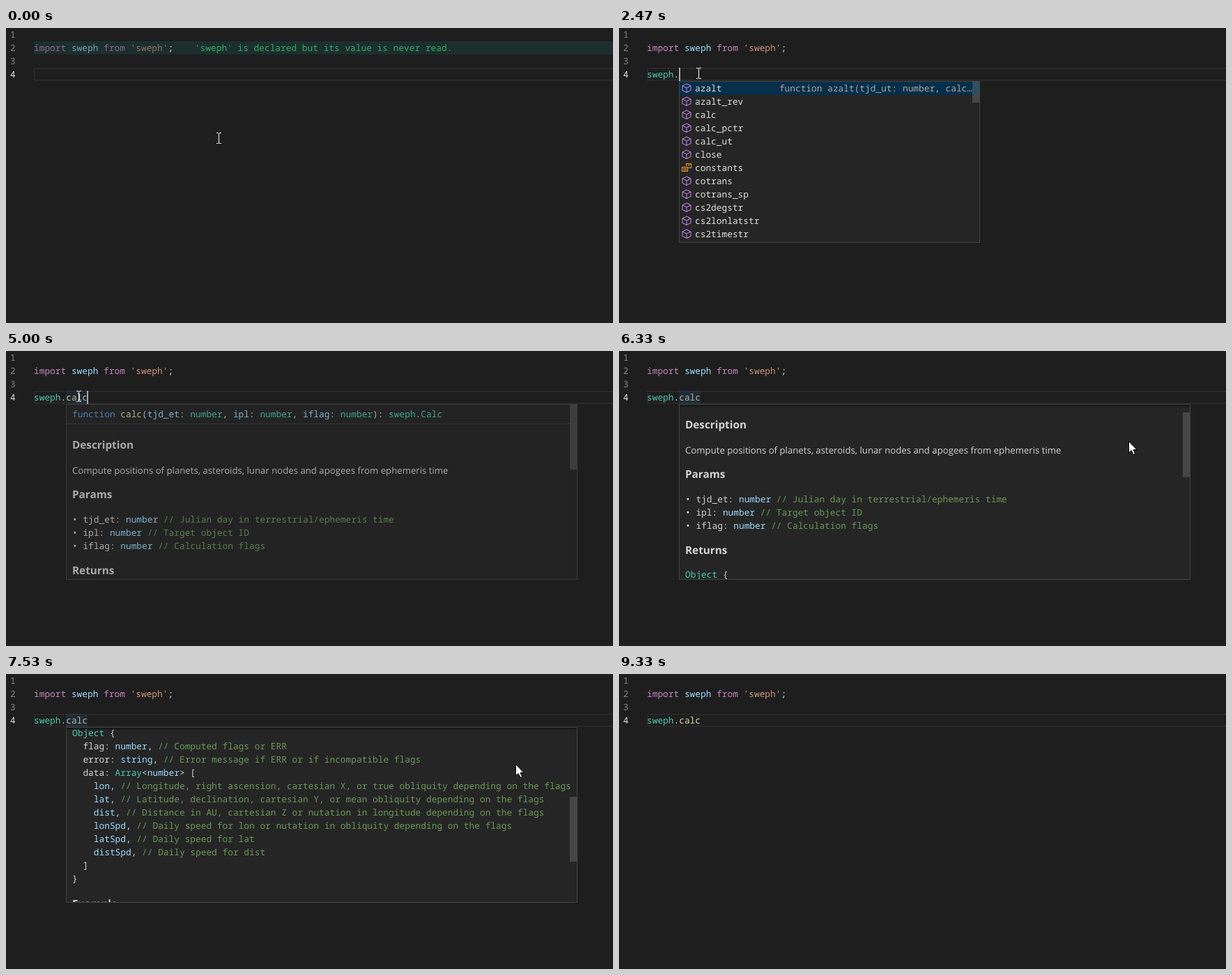
Animation of 871x423 px, one loop 9870 ms. Source, as an HTML page with a canvas:

```html
<!DOCTYPE html>
<html lang="en">
<head>
<meta charset="utf-8">
<title>Editor completion</title>
<style>
html, body { margin: 0; height: 100%; overflow: hidden; background: #1e1e1e; }
canvas { display: block; }
</style>
</head>
<body>
<canvas id="stage" width="871" height="423"></canvas>
<script>
const ctx = document.getElementById('stage').getContext('2d');
const LOOP = 9870, TICK = 200 / 3;
const CHAR = 7.697, LEFT = 40, ROW = 19;
const MONO = '12.83px "Noto Sans Mono", monospace';
const BODY = '13.19px "Open Sans", sans-serif';
const HEAD = 'bold 15.3px "Open Sans", sans-serif';

const COLORS = {
  k: '#c586c0', v: '#9cdcfe', s: '#ce9178', t: '#4ec9b0', f: '#dcdcaa', c: '#6a9955',
  b: '#569cd6', d: '#d4d4d4', n: '#858585', w: '#e0e0e0', h: '#0097fb', g: '#2faf64',
  e: '#ff6464', m: '#a8a8a8'
};

const ICONS = {
  cube: ['#b180d7', 'M8 2L14 5V11.5L8 14.5L2 11.5V5ZM2 5L8 8L14 5M8 8V14.5'],
  field: ['#75beff', 'M1.5 6.5L9 3L14.5 5.5V10L7 13.5L1.5 11ZM1.5 6.5L7 9L14.5 5.5M7 9V13.5'],
  variable: ['#75beff', 'M4 4H1.5V12.5H4M12 4H14.5V12.5H12M5 8L9 6L11.5 7V9L7.5 11L5 10ZM5 8L7.5 9L11.5 7'],
  keyword: ['#c5c5c5', 'M1.5 3.5H7.5V6H1.5ZM10 4.5H15M1 8.5H4M6 8.5H15M1 12.5H9M11 12.5H15'],
  snippet: ['#c5c5c5', 'M2.5 14V2.5H14.5V14M2 14.5H4M6 14.5H8M10 14.5H12M14 14.5H15'],
  module: ['#ee9d28', 'M7.5 6V2.5H14.5V8.5H10M9.5 4.5H13M1.5 7.5H9.5V13.5H1.5ZM3 9.5H8M3 11.5H8']
};

// [label, icon, detail, detail always visible]
const GLOBALS = [
  ['sweph', 'variable', '(alias) module "sweph"'],
  ['switch', 'keyword'],
  ['switch', 'snippet', 'Switch Statement', true],
  ['SharedWorker', 'variable'],
  ['spawn', 'cube'],
  ['spawnSync', 'cube'],
  ['ServiceWorker', 'variable'],
  ['ServiceWorkerContainer', 'variable'],
  ['ServiceWorkerMessageEvent', 'variable'],
  ['ServiceWorkerRegistration', 'variable'],
  ['SIGWINCH', 'field'],
  ['S_IWGRP', 'variable']
];
const MEMBERS = [
  ['azalt', 'cube', 'function azalt(tjd_ut: number, calc…'],
  ['azalt_rev', 'cube', 'function azalt_rev(tjd_ut: number, …'],
  ['calc', 'cube', 'function calc(tjd_et: number, ipl: …'],
  ...['calc_pctr', 'calc_ut', 'close', 'constants', 'cotrans', 'cotrans_sp',
    'cs2degstr', 'cs2lonlatstr', 'cs2timestr'
  ].map(name => [name, name === 'constants' ? 'module' : 'cube'])
];

// Each block: centre of its first line, font, lines
const DOC = [
  [90, MONO, ['bfunction |fcalc|d(|vtjd_et|d: |tnumber|d, |vipl|d: |tnumber|d, |viflag|d: |tnumber|d): |tsweph|d.|tCalc']],
  [135, HEAD, ['dDescription']],
  [171, BODY, ['dCompute positions of planets, asteroids, lunar nodes and apogees from ephemeris time']],
  [206, HEAD, ['dParams']],
  [241, MONO, [
    'd• tjd_et: |vnumber |c// Julian day in terrestrial/ephemeris time',
    'd• ipl: |vnumber |c// Target object ID',
    'd• iflag: |vnumber |c// Calculation flags']],
  [315, HEAD, ['dReturns']],
  [349, MONO, [
    'tObject |d{',
    'd  flag: |vnumber|d, |c// Computed flags or ERR',
    'd  error: |vstring|d, |c// Error message if ERR or if incompatible flags',
    'd  data: |tArray|d<|vnumber|d> [',
    'v    lon|d, |c// Longitude, right ascension, cartesian X, or true obliquity depending on the flags',
    'v    lat|d, |c// Latitude, declination, cartesian Y, or mean obliquity depending on the flags',
    'v    dist|d, |c// Distance in AU, cartesian Z or nutation in longitude depending on the flags',
    'v    lonSpd|d, |c// Daily speed for lon or nutation in obliquity depending on the flags',
    'v    latSpd|d, |c// Daily speed for lat',
    'v    distSpd|d, |c// Daily speed for dist',
    'd  ]',
    'd}']],
  [595, HEAD, ['dExample']],
  [629, MONO, [
    'bconst |d{ |vSE_SUN|d, |vSEFLG_SPEED |d} = |vsweph|d.|vconstants|d;',
    'bconst |vresult|d = |vsweph|d.|fcalc|d(',
    'd  2451545, |c// Julian day',
    'v  SE_SUN|d, |c// Target object',
    'v  SEFLG_SPEED |c// Calculation flags',
    'd);']]
];

// [time, x, y]
const MOUSE = [
  [0, 305, 158], [470, 114, 63], [600, 114, 63], [670, 114, 65], [4070, 114, 65],
  [4470, 104, 65], [5470, 104, 65], [5870, 732, 130], [8800, 732, 130], [9270, 690, 405]
];
// [time, offset]
const SCROLL = [
  [6130, 0], [6500, 53], [6870, 101], [7070, 159], [7130, 159],
  [7530, 265], [7670, 265], [8000, 371], [8130, 371], [8330, 422]
];
// [time, text of line 4]
const TYPING = [
  [0, ''], [1470, 's'], [1600, 'sw'], [1800, 'swe'], [1930, 'sweph'], [2330, 'sweph.'], [3730, 'sweph.calc']
];

const smooth = p => p * p * (3 - 2 * p);

function track(keys, t, ease = p => p) {
  const i = keys.findIndex(key => key[0] > t);
  if (i < 0) return keys[keys.length - 1].slice(1);
  if (i === 0) return keys[0].slice(1);
  const [a, b] = [keys[i - 1], keys[i]];
  const p = ease((t - a[0]) / (b[0] - a[0]));
  return a.slice(1).map((value, j) => value + (b[j + 1] - value) * p);
}

function rect(color, x, y, w, h) {
  ctx.fillStyle = color;
  ctx.fillRect(x, y, w, h);
}

function frame(color, x, y, w, h) {
  ctx.strokeStyle = color;
  ctx.lineWidth = 1;
  ctx.strokeRect(x + .5, y + .5, w - 1, h - 1);
}

// Markup: runs split by "|", each led by its colour key
function write(markup, x, centre, font = MONO) {
  ctx.font = font;
  for (const run of markup.split('|')) {
    ctx.fillStyle = COLORS[run[0]];
    ctx.fillText(run.slice(1), x, centre + 5);
    x += (run.length - 1) * CHAR;
  }
}

// Marks the letters of a label that match the typed ones, in order
function match(label, typed) {
  let next = 0;
  const marks = [...label].map(ch => ch.toLowerCase() === typed[next] && ++next > 0);
  return { marks, full: next === typed.length };
}

function drawIcon(name, x, y) {
  const [color, path] = ICONS[name];
  ctx.save();
  ctx.translate(x, y);
  ctx.strokeStyle = color;
  ctx.lineWidth = 1.1;
  ctx.stroke(new Path2D(path));
  ctx.restore();
}

function drawList(column, items, typed, selected, thumb) {
  const x = Math.floor(LEFT + column * CHAR);
  const rows = items.filter(item => match(item[0], typed).full);
  const full = rows.length === 12;
  const height = rows.length * ROW + (full ? 4 : 2);
  rect('#252526', x, 76, 432, height);
  rect('#062f4a', x + 1, 77 + selected * ROW, 430, ROW);
  rows.forEach(([label, icon, detail, always], i) => {
    const centre = 86 + i * ROW;
    drawIcon(icon, x + 3, centre - 8);
    const { marks } = match(label, typed);
    write([...label].map((ch, j) => (marks[j] ? 'h' : 'w') + ch).join('|'), x + 23, centre);
    if (detail && (always || i === selected)) write('m' + detail, x + 421 - detail.length * CHAR, centre);
  });
  if (full) rect('rgba(121,121,121,.4)', x + 421, 77, 10, thumb);
  frame('#454545', x, 76, 432, height);
}

function drawHover(scroll, alpha) {
  ctx.save();
  ctx.globalAlpha = alpha;
  rect('rgba(38,79,120,.25)', 86, 57, 31, ROW);
  rect('#252526', 86, 76, 734, 252);
  ctx.beginPath();
  ctx.rect(87, 77, 732, 250);
  ctx.clip();
  rect('#3a3a3b', 87, 104 - scroll, 722, 1);
  for (const [top, font, lines] of DOC) {
    lines.forEach((line, i) => write(line, 95, top + i * ROW - scroll, font));
  }
  if (scroll > 0) {
    const shade = ctx.createLinearGradient(0, 77, 0, 81);
    shade.addColorStop(0, 'rgba(0,0,0,.5)');
    shade.addColorStop(1, 'rgba(0,0,0,0)');
    rect(shade, 87, 77, 732, 4);
  }
  rect('rgba(121,121,121,.4)', 809, 77 + Math.round(scroll * 250 / 672), 10, 93);
  ctx.restore();
  ctx.save();
  ctx.globalAlpha = alpha;
  frame('#454545', 86, 76, 734, 252);
  ctx.restore();
}

function drawMouse(x, y, arrow) {
  x = Math.round(x);
  y = Math.round(y);
  if (arrow) {
    ctx.save();
    ctx.translate(x, y);
    const shape = new Path2D('M-.5 -.5V16L3.2 12.6L6 18.5L8.6 17.3L6 11.6H11Z');
    ctx.lineWidth = 1;
    ctx.strokeStyle = '#000';
    ctx.fillStyle = '#fff';
    ctx.fill(shape);
    ctx.stroke(shape);
    ctx.restore();
    return;
  }
  rect('#fff', x, y - 7, 1, 14);
  for (const edge of [y - 8, y + 7]) {
    rect('#fff', x - 3, edge, 3, 1);
    rect('#fff', x + 1, edge, 3, 1);
  }
}

function drawEditor(t, typed) {
  const unused = t < 2470, error = t >= 2930 && t < 4200;
  rect('#1e1e1e', 0, 0, 871, 423);
  if (unused) rect('#1d2e2e', LEFT, 19, 831, ROW);
  if (error) rect('#332424', LEFT, 57, 831, ROW);
  ctx.strokeStyle = error ? '#3c2e2e' : '#282828';
  ctx.lineWidth = 2;
  ctx.strokeRect(LEFT + 1, 58, 840, 17);

  for (let i = 0; i < 4; i++) write((i < 3 ? 'n' : 'w') + (i + 1), 6, 9 + i * ROW);
  ctx.globalAlpha = unused ? .66 : 1;
  write("kimport |vsweph |kfrom |s'sweph'", LEFT, 28);
  ctx.globalAlpha = 1;
  write('d;', LEFT + 25 * CHAR, 28);
  if (unused) write("g'sweph' is declared but its value is never read.", LEFT + 30 * CHAR, 28);

  const nameColor = t < 2130 ? 'v' : 't', memberColor = t < 3870 ? 'd' : 'f';
  write(`${nameColor}${typed.slice(0, 5)}|d${typed.slice(5, 6)}|${memberColor}${typed.slice(6)}`, LEFT, 66);
  if (error) {
    write('eIdentifier expected.', LEFT + (typed.length + 4) * CHAR, 66);
    if (typed.length === 6) {
      ctx.strokeStyle = '#f14c4c';
      ctx.lineWidth = 1;
      ctx.stroke(new Path2D('M79 75L81 73L83 75L85 73L86.5 74.5'));
    }
  }
}

function draw(t) {
  const typed = TYPING.filter(key => key[0] <= t).pop()[1];
  drawEditor(t, typed);

  const caretOn = t < 3730 ? t >= 930 && !(t >= 2930 && t < 3530) : (t + 290) % 1000 < 490;
  if (caretOn) rect('#aeafad', Math.round(LEFT + typed.length * CHAR - .5), 57, 2, ROW);

  if (t >= 1600 && t < 2330) drawList(typed.length, GLOBALS, typed, 0, 92);
  if (t >= 2400 && t < 3730) drawList(6, MEMBERS, '', t < 3070 ? 0 : t < 3270 ? 1 : 2, 30);

  const hover = t >= 4930 && t < 9200;
  if (hover) drawHover(Math.round(track(SCROLL, t)[0]), Math.min(1, (t - 4870) / 170));

  if (t < 9330) {
    const [x, y] = track(MOUSE, t, smooth);
    drawMouse(x, y, hover && y > 77 && y < 328);
  }
}

ctx.textRendering = 'geometricPrecision';
const start = performance.now();

function loop() {
  const elapsed = (performance.now() - start) % LOOP;
  draw(Math.round(Math.floor((elapsed + 4) / TICK) * TICK / 10) * 10);
  requestAnimationFrame(loop);
}
loop();
</script>
</body>
</html>
```
